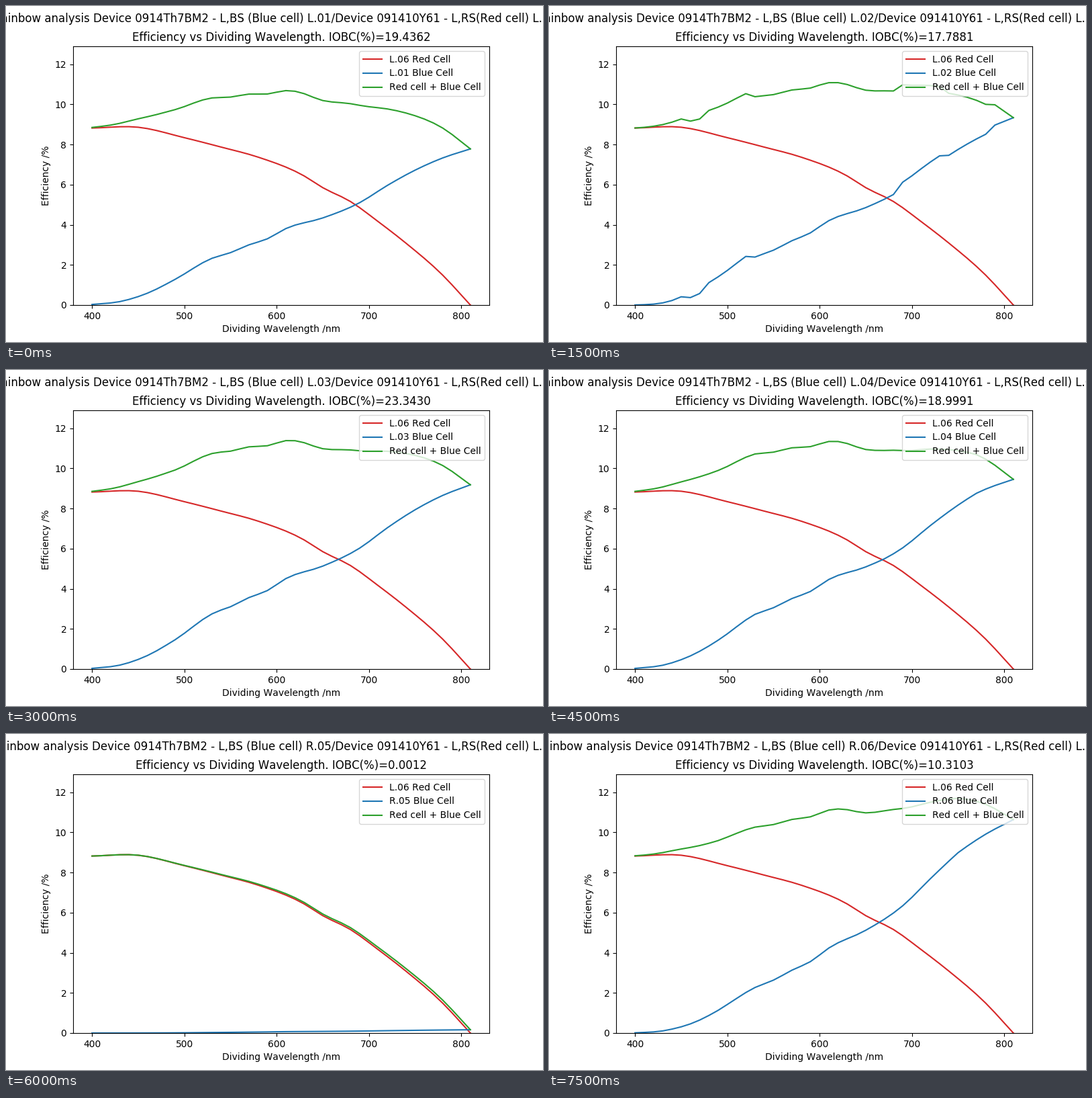
Animation of 800x500 px, one loop 8000 ms. Source, as a matplotlib script:

```python
import numpy as np
import matplotlib.pyplot as plt
from matplotlib.animation import FuncAnimation

STEP_MS = 500
STEPS = 16
STEPS_PER_CELL = 3

plt.rcParams["text.kerning_factor"] = 6  # no sub-pixel kerning

nm = np.arange(400, 811, 10)


def smooth(*knots):
    """Cubic Hermite curve through (wavelength, efficiency) knots."""
    x, y = np.array(knots).T
    slope = np.gradient(y, x)
    k = np.clip(np.searchsorted(x, nm, "right") - 1, 0, len(x) - 2)
    h = x[k + 1] - x[k]
    t = (nm - x[k]) / h
    return ((1 + 2 * t) * (1 - t) ** 2 * y[k]
            + t * (1 - t) ** 2 * h * slope[k]
            + t ** 2 * (3 - 2 * t) * y[k + 1]
            + t ** 2 * (t - 1) * h * slope[k + 1])


def gain(*knots):
    """Piecewise linear factor through (wavelength, factor) knots."""
    return np.interp(nm, *zip(*knots))


red = smooth(
    (400, 8.82), (450, 8.86), (500, 8.34), (540, 7.87), (580, 7.37),
    (630, 6.43), (650, 5.85), (680, 5.16), (710, 4.16), (740, 3.09),
    (780, 1.49), (810, 0))
base = smooth(
    (400, 0.03), (430, 0.17), (460, 0.59), (490, 1.28), (530, 2.33),
    (550, 2.61), (570, 3.00), (590, 3.30), (610, 3.81), (650, 4.34),
    (690, 5.10), (720, 5.96), (750, 6.72), (780, 7.33), (810, 7.78))

# Every blue cell is the base response times its own gain
cells = [
    ("L.01", 19.4362, 1),
    ("L.02", 17.7881, gain(
        (400, 0.1), (450, 0.98), (460, 0.63), (470, 0.72), (480, 1.08),
        (520, 1.148), (530, 1.026), (600, 1.1), (680, 1.13), (690, 1.2),
        (730, 1.194), (740, 1.151), (780, 1.161), (790, 1.197),
        (810, 1.2))),
    ("L.03", 23.3430, gain(
        (400, 1.14), (490, 1.14), (540, 1.19), (620, 1.182),
        (810, 1.18))),
    ("L.04", 18.9991, gain(
        (400, 1.11), (480, 1.11), (530, 1.17), (670, 1.173),
        (770, 1.226), (810, 1.215))),
    ("R.05", 0.0012, gain((400, 0), (600, 0.018), (810, 0.021))),
    ("R.06", 10.3103, gain(
        (400, 0.4), (440, 0.7), (500, 0.92), (550, 1.01), (650, 1.18),
        (750, 1.337), (810, 1.367))),
]

fig, ax = plt.subplots(figsize=(8, 5), dpi=100)
heading = fig.suptitle("")


def draw(step):
    name, iobc, factor = cells[step // STEPS_PER_CELL]
    blue = base * factor
    ax.clear()
    ax.plot(nm, red, color="tab:red", label="L.06 Red Cell")
    ax.plot(nm, blue, color="tab:blue", label=f"{name} Blue Cell")
    ax.plot(nm, red + blue, color="tab:green", label="Red cell + Blue Cell")
    ax.set_xlim(379.5, 830.5)
    ax.set_ylim(0, 12.892)
    ax.set_xlabel("Dividing Wavelength /nm")
    ax.set_ylabel("Efficiency /%")
    ax.set_title(f"Efficiency vs Dividing Wavelength. IOBC(%)={iobc:.4f}")
    ax.legend(loc="upper right")
    heading.set_text(
        f"Rainbow analysis Device 0914Th7BM2 - L,BS (Blue cell) {name}"
        "/Device 091410Y61 - L,RS(Red cell) L.06")
    return []


anim = FuncAnimation(fig, draw, frames=STEPS, interval=STEP_MS,
                     init_func=lambda: draw(0), repeat=True)
plt.show()
```
